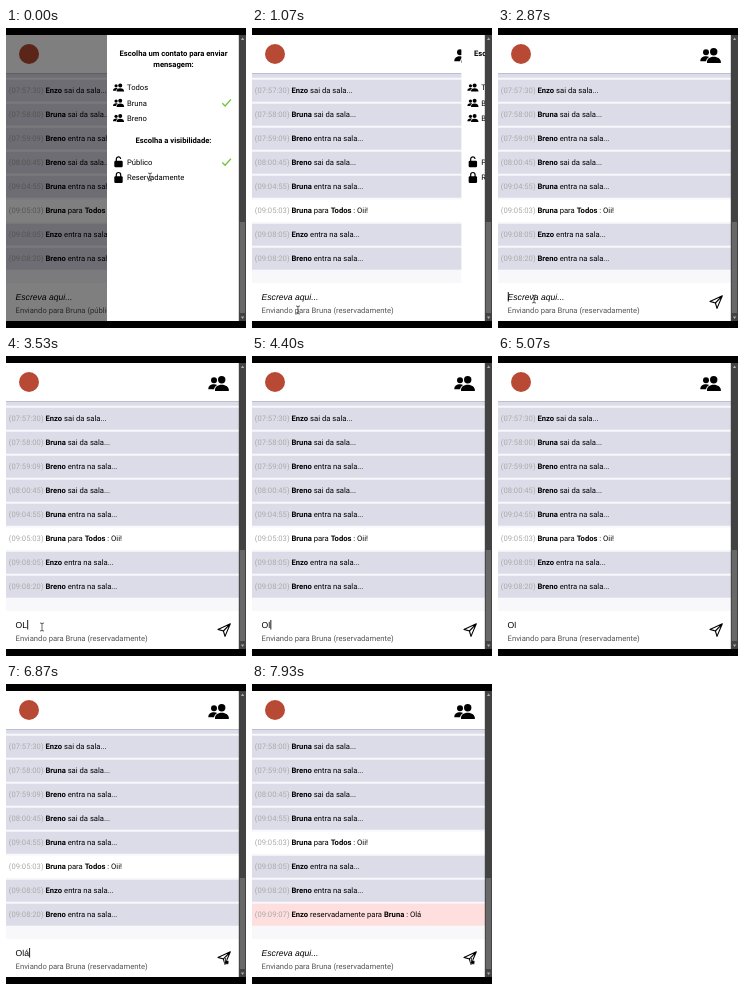
Write an HTML page that moves like this. It is 240 px wide and 300 px high and loops after 8 s.

```html
<!DOCTYPE html>
<html lang="pt-BR">
<head>
<meta charset="utf-8">
<title>Sala de conversa</title>
<style>
  html, body { margin: 0; width: 100%; height: 100%; overflow: hidden; background: #000; }
  svg { display: block; width: 100vw; height: 100vh; }
  text { font: 7.65px Roboto, sans-serif; white-space: pre; text-rendering: geometricPrecision; }
  .bold { font-weight: 700; }
  .time { fill: #aaa; }
  .middle { text-anchor: middle; }
  .input { font: 8.6px "Liberation Sans", Arial, sans-serif; }
  .line { fill: none; stroke: #000; stroke-linejoin: round; stroke-linecap: round; }
</style>
</head>
<body>
<svg viewBox="0 0 240 300">
  <defs>
    <clipPath id="page"><rect y="7" width="240" height="286"/></clipPath>
    <g id="people">
      <circle cx="5.7" cy="4.3" r="3"/>
      <path d="M0 13.2C0 9.7 2.3 8.2 5.7 8.2C7 8.2 8 8.4 8.8 8.9C6.9 10 6 11.5 5.8 13.2Z"/>
      <circle cx="13.4" cy="3.7" r="3.7"/>
      <path d="M6.7 15C6.3 10.8 9.3 8.7 13.4 8.7S20.8 10.8 20.6 15Z"/>
    </g>
    <rect id="lockBody" y="4.4" width="8.4" height="6.6" rx="1.2"/>
    <g id="closedLock">
      <use href="#lockBody"/>
      <path class="line" stroke-width="1.2" d="M2 5V2.8A2.2 2.2 0 0 1 6.4 2.8V5"/>
    </g>
    <g id="openLock">
      <use href="#lockBody"/>
      <path class="line" stroke-width="1.2" d="M2 5V2.6A2.2 2.2 0 0 1 6.3 2.2"/>
    </g>
    <path id="check" d="M0 4.2L2.8 7L8.6 .5" fill="none" stroke="#72c63a" stroke-width="1.3"/>
  </defs>

  <g clip-path="url(#page)">
    <rect y="7" width="240" height="286" fill="#f8f8fb"/>
    <g id="messages"></g>

    <rect y="7" width="234" height="38.5" fill="#fff"/>
    <rect y="45" width="234" height="1" fill="#b9c0cf"/>
    <circle cx="23" cy="26" r="10" fill="#b84a35"/>
    <use href="#people" x="202.3" y="20"/>

    <rect y="255" width="234" height="38" fill="#fff"/>
    <text id="entry" class="input" x="9.6" y="271.8"></text>
    <rect id="caret" y="264" width=".9" height="9.5"/>
    <text id="recipient" x="9.6" y="285.3" fill="#555"></text>
    <path class="line" stroke-width="1.1" d="M224.3 267.8L212 273.4L217.4 275L219 280.4ZL217.4 275"/>

    <rect id="shade" y="7" width="234" height="286" fill="#000" opacity=".5"/>
    <g id="sidebar">
      <rect x="101" y="7" width="139" height="286" fill="#fff"/>
      <text class="bold middle" x="167.5" y="28">Escolha um contato para enviar</text>
      <text class="bold middle" x="167.5" y="39.4">mensagem:</text>
      <text class="bold middle" x="167.5" y="115">Escolha a visibilidade:</text>
      <g id="options"></g>
      <use href="#check" x="216.3" y="71"/>
      <use id="choice" href="#check" x="216.3"/>
    </g>

    <rect x="232.8" y="7" width="7.2" height="286" fill="#424242"/>
    <rect x="233.8" y="194" width="5.2" height="91" fill="#686868"/>
    <path d="M234.9 12L236.6 9.5L238.3 12ZM234.9 288.5L236.6 291L238.3 288.5Z" fill="#aaa"/>
    <g id="pointer">
      <path id="beam" class="line" stroke-width=".6" d="M-1.6-4Q0-4 0-3Q0-4 1.6-4M0-3V3M-1.6 4Q0 4 0 3Q0 4 1.6 4"/>
      <path id="arrow" d="M0 0V8.2L2 6.4L3.4 9.3L4.8 8.6L3.4 5.9H6Z" stroke="#fff" stroke-width=".5"/>
      <path id="hand" d="M-.6-.2Q0-.8 .6-.2V2.2L2.6 2.8Q3.4 3.1 3.2 4L2.8 6.2H-.2L-2 3.8Q-1.8 3-.6 3.7Z" stroke="#fff" stroke-width=".4"/>
    </g>
  </g>
</svg>
<script>
const LOOP = 8000, ROW = 24, SENT = 7400, CHOSEN = 300, CLOSE = 880, CLOSE_TIME = 360;
const $ = id => document.getElementById(id);
const enters = "entra na sala...", leaves = "sai da sala...";
const bold = name => `<tspan class="bold">${name}</tspan>`;

const messages = [
  ["07:57:30", "Enzo", leaves],
  ["07:58:00", "Bruna", leaves],
  ["07:59:09", "Breno", enters],
  ["08:00:45", "Breno", leaves],
  ["09:04:55", "Bruna", enters],
  ["09:05:03", "Bruna", `para ${bold("Todos")} : Oii!`, "#fff"],
  ["09:08:05", "Enzo", enters],
  ["09:08:20", "Breno", enters],
  ["09:09:07", "Enzo", `reservadamente para ${bold("Bruna")} : Olá`, "#ffdede"]
];

const rowBox = (i, color = "#dcdce8") =>
  `<rect y="${51.7 + i * ROW}" width="234" height="22" fill="${color}"/>`;
$("messages").innerHTML = rowBox(-1) + messages.map(([time, name, body, color], i) =>
  `<g>${rowBox(i, color)}<text x="2.8" y="${65.3 + i * ROW}">` +
  `<tspan class="time">(${time})</tspan> ${bold(name)} ${body}</text></g>`).join("");
const newMessage = $("messages").lastElementChild;

const option = (label, y, icon) => `<text x="121" y="${y + 2.7}">${label}</text>` + icon;
const person = (name, y) =>
  option(name, y, `<use href="#people" transform="translate(107 ${y - 4}) scale(.54)"/>`);
const lock = (label, y, icon) =>
  option(label, y, `<use href="#${icon}" x="108.3" y="${y - 5.7}"/>`);
$("options").innerHTML =
  person("Todos", 59.5) + person("Bruna", 74.8) + person("Breno", 90) +
  lock("Público", 134, "openLock") + lock("Reservadamente", 149.6, "closedLock");

// [start, text]; null means an unfocused field
const typing = [[0, null], [2500, ""], [3050, "O"], [3400, "OL"], [3800, "O"], [4200, "Ol"], [5400, "Olá"], [7150, null]];

// [time, x, y, shape]
const path = [
  [0, 144, 149, "beam"], [400, 144, 149, "arrow"], [780, 66, 225, "arrow"], [880, 64, 230, "arrow"],
  [1060, 46, 282, "beam"], [1500, 46, 282, "beam"], [1900, 36, 271, "beam"], [3650, 36, 271, ""],
  [5450, 36, 271, "beam"], [5750, 121, 265, "beam"], [6100, 121, 265, "beam"],
  [6600, 219.6, 274, "hand"], [LOOP, 219.6, 274, "hand"]
];

const current = (list, t) => list.findLast(step => step[0] <= t);
const show = (node, on) => node.style.display = on ? "" : "none";

function drawPointer(t) {
  const i = path.findLastIndex(step => step[0] <= t);
  const [t0, x0, y0, shape] = path[i], [t1, x1, y1] = path[i + 1];
  const p = (t - t0) / (t1 - t0), k = p * p * (3 - 2 * p);
  $("pointer").setAttribute("transform", `translate(${x0 + (x1 - x0) * k} ${y0 + (y1 - y0) * k})`);
  for (const id of ["beam", "arrow", "hand"]) show($(id), id === shape);
}

function drawEntry(t) {
  const [since, value] = current(typing, t), entry = $("entry");
  entry.textContent = value || "Escreva aqui...";
  entry.style.fontStyle = value ? "normal" : "italic";
  $("caret").setAttribute("x", 9.8 + (value ? entry.getComputedTextLength() : 0));
  show($("caret"), value !== null && (t - since) % 1060 < 530);
}

function draw(now) {
  const t = now % LOOP;
  const slide = Math.min(1, Math.max(0, (t - CLOSE) / CLOSE_TIME));
  const hidden = t >= CHOSEN;
  $("sidebar").setAttribute("transform", `translate(${139 * (1 - (1 - slide) ** 2)} 0)`);
  show($("shade"), t < CLOSE);
  $("choice").setAttribute("y", hidden ? 145.8 : 130.3);
  $("recipient").textContent = `Enviando para Bruna (${hidden ? "reservadamente" : "público"})`;
  $("messages").setAttribute("transform", `translate(0 ${t >= SENT ? -ROW : 0})`);
  show(newMessage, t >= SENT);
  drawEntry(t);
  drawPointer(t);
}

const start = performance.now();
function tick() {
  draw(performance.now() - start);
  requestAnimationFrame(tick);
}
tick();
</script>
</body>
</html>
```
